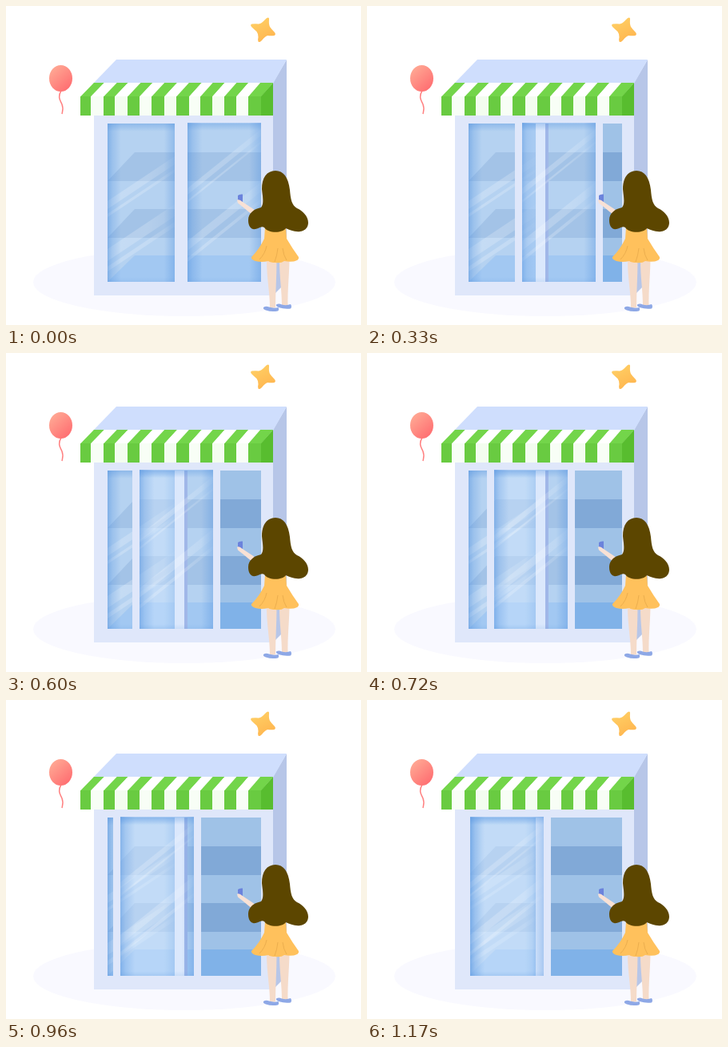
An HTML page for the animation above (1200 ms loop, 444x399 px).

```html
<!DOCTYPE html>
<html lang="en">
<head>
<meta charset="utf-8">
<title>Sliding shop door</title>
<style>
html, body { margin: 0; width: 100%; height: 100%; overflow: hidden; background: #fff; }
svg { display: block; }
</style>
</head>
<body>
<svg id="stage" width="444" height="399" viewBox="0 0 444 399">
  <defs>
    <linearGradient id="balloon" x1="0" y1="0" x2=".8" y2="1">
      <stop offset="0" stop-color="#ffb199"/><stop offset="1" stop-color="#ff6c70"/>
    </linearGradient>
    <linearGradient id="star" x1=".2" y1="0" x2=".7" y2="1">
      <stop offset="0" stop-color="#ffd065"/><stop offset="1" stop-color="#ffb54f"/>
    </linearGradient>
    <linearGradient id="sides">
      <stop offset="0" stop-color="#4f90de" stop-opacity=".52"/>
      <stop offset=".07" stop-color="#4f90de" stop-opacity=".26"/>
      <stop offset=".2" stop-color="#4f90de" stop-opacity="0"/>
      <stop offset=".84" stop-color="#4f90de" stop-opacity="0"/>
      <stop offset="1" stop-color="#4f90de" stop-opacity=".36"/>
    </linearGradient>
    <linearGradient id="ends" x2="0" y2="1">
      <stop offset="0" stop-color="#4f90de" stop-opacity=".38"/>
      <stop offset=".05" stop-color="#4f90de" stop-opacity="0"/>
      <stop offset=".97" stop-color="#4f90de" stop-opacity="0"/>
      <stop offset="1" stop-color="#4f90de" stop-opacity=".12"/>
    </linearGradient>
    <linearGradient id="glare">
      <stop offset="0" stop-color="#fff" stop-opacity=".22"/>
      <stop offset=".6" stop-color="#fff" stop-opacity=".2"/>
      <stop offset="1" stop-color="#fff" stop-opacity=".06"/>
    </linearGradient>
  </defs>

  <ellipse cx="223" cy="345.5" rx="189" ry="42.5" fill="#f9f9ff"/>

  <!-- shop body -->
  <path d="M334 96L351 67V345L334 362Z" fill="#b7c6e8"/>
  <path d="M109 97L138 67H351L334 97Z" fill="#cfdefd"/>
  <path d="M110 113H334V362H110Z" fill="#dfe7fa"/>

  <!-- shelves -->
  <path d="M127 147H319V345H127Z" fill="#9fc2e7"/>
  <path d="M161 183H319V219H127ZM161 254H319V290H127Z" fill="#81a9d7"/>
  <path d="M161 312H319V345H127Z" fill="#80b2e8"/>

  <svg id="pane" x="127" y="147" width="84" height="198"></svg>
  <path d="M211 146H223V345H211Z" fill="#dfe7fa"/>
  <path d="M223 147H227V345H223Z" fill="#7c96d8"/>

  <g id="door">
    <path d="M218 146H227V345H218ZM319 146H328V345H319Z" fill="#dfe7fa"/>
    <svg id="glass" x="227" y="146" width="92" height="199"></svg>
  </g>

  <g id="awning"></g>

  <!-- balloon -->
  <path d="M69 106C64 114 68 118 70 123S71 130 70 135" fill="none" stroke="#ff8080" stroke-width="1.5"/>
  <ellipse cx="68.5" cy="90.5" rx="14.5" ry="16.5" fill="url(#balloon)"/>

  <path d="M327.500 14.500Q329.500 14.500 329 17Q328.500 23 330 26Q332 29 336 33Q338 35.500 335.500 37Q331 37.500 327.500 37Q324.500 37.500 320 43Q317.500 46 315.500 44.500Q314.500 43 315.500 39Q315.500 34.500 313.500 32Q310.500 29.500 307 26Q305 23.500 307.500 22.500Q312 22 316 22.500Q319.500 22 324 17Q326 14.500 327.500 14.500Z" fill="url(#star)"/>

  <!-- customer -->
  <g>
    <path d="M326 318H338.500C338.500 338 337 358 337 377.500H330C330 358 326 340 326 318ZM342 318H354.500C354 340 352 355 352.500 375H345C345 355 342 340 342 318Z" fill="#f5dbc9"/>
    <path d="M322 377Q325 375 329 376.500Q335 378.500 340.500 377Q342 380 340 381.500Q332 383 325 380.500Q321 379 322 377ZM338 373.500Q341 371.500 345 373.500Q351 375 356 373Q358 376 356 378.500Q348 379.500 341 377Q337 375 338 373.500Z" fill="#8ea8e6"/>
    <path d="M290 237Q292 235 296 235.500V246L290 246Z" fill="#6b83dc"/>
    <path d="M289 243Q290 241.500 293 243L298 246.500L314 257L309 262L297 252L290 246.500Z" fill="#f8e1d5"/>
    <path d="M324 277H350L351 291Q358 303 366 314Q367 318 360 319.500Q353 320 348 319Q344 322 337 321Q331 321 328 319Q320 321 312 319Q306 317 307 314Q317 304 323 291Z" fill="#ffc15c"/>
    <path d="M326 300Q324 310 317 317M340 303Q339 312 336 320M346 303Q347 312 351 318" fill="none" stroke="#e6a94b" stroke-width=".8"/>
    <path d="M337 206C326 206 320 215 320 229C321 239 323 247 319 252C310 254 303 259 303 268C303 276 307 280 312 279C317 278 320 275 323 277C327 284 345 285 350 278C355 280 361 283 368 282C375 281 378 276 378 271C378 263 371 256 364 253C357 249 356 241 355 230C353 214 347 206 337 206Z" fill="#5c4600"/>
  </g>
</svg>
<script>
const LOOP = 1200, STEP = 30;
const $ = id => document.getElementById(id);
const poly = (points, fill) => `<polygon points="${points}" fill="${fill}"/>`;

// Diagonal reflection: left edge height, rise across the pane, thickness
const streak = (w, [y, rise, h]) =>
  poly(`0,${y} ${w},${y - rise} ${w},${y - rise + h} 0,${y + h}`, "url(#glare)");

function glaze(id, w, h, streaks) {
  const sheet = (fill, alpha = 1) =>
    `<rect width="${w}" height="${h}" fill="${fill}" fill-opacity="${alpha}"/>`;
  $(id).innerHTML = sheet("#d4e8ff", 0.4) + streaks.map(s => streak(w, s)).join("") +
    sheet("url(#sides)") + sheet("url(#ends)");
}

function drawAwning() {
  const edges = [93, 106, 122, 136, 152, 167, 182, 198, 213, 229, 243, 258, 273, 288, 303, 319];
  const top = x => 110 + (x - 93) * 224 / 226;
  let out = "";
  for (let i = 0; i < edges.length - 1; i++) {
    const a = edges[i], b = edges[i + 1], green = i % 2 === 0;
    out += poly(`${a},113.500 ${top(a)},96 ${top(b)},96 ${b},113.500`, green ? "#73d54a" : "#fff");
    out += poly(`${a},113 ${b},113 ${b},137 ${a},137`, green ? "#69cb41" : i % 4 === 1 ? "#f8fef6" : "#f3fdef");
  }
  $("awning").innerHTML = out + poly("319,113 334,96 334,137 319,137", "#58bd2f");
}

// Fast for the first half, then slower
const slide = t => t < 600 ? -t / 10 : -60 - (t - 600) / 15;

function draw(now) {
  const t = Math.floor((now % LOOP) / STEP) * STEP;
  $("door").setAttribute("transform", `translate(${slide(t)} 0)`);
}

glaze("pane", 84, 198, [[97, 56, 10], [113, 56, 4], [157, 56, 15], [179, 56, 6]]);
glaze("glass", 92, 199, [[82, 74, 8], [97, 74, 3], [148, 74, 12], [169, 74, 5]]);
drawAwning();
draw(0);

let start;
function tick(now) {
  start ??= now;
  draw(now - start);
  requestAnimationFrame(tick);
}
requestAnimationFrame(tick);
</script>
</body>
</html>
```
